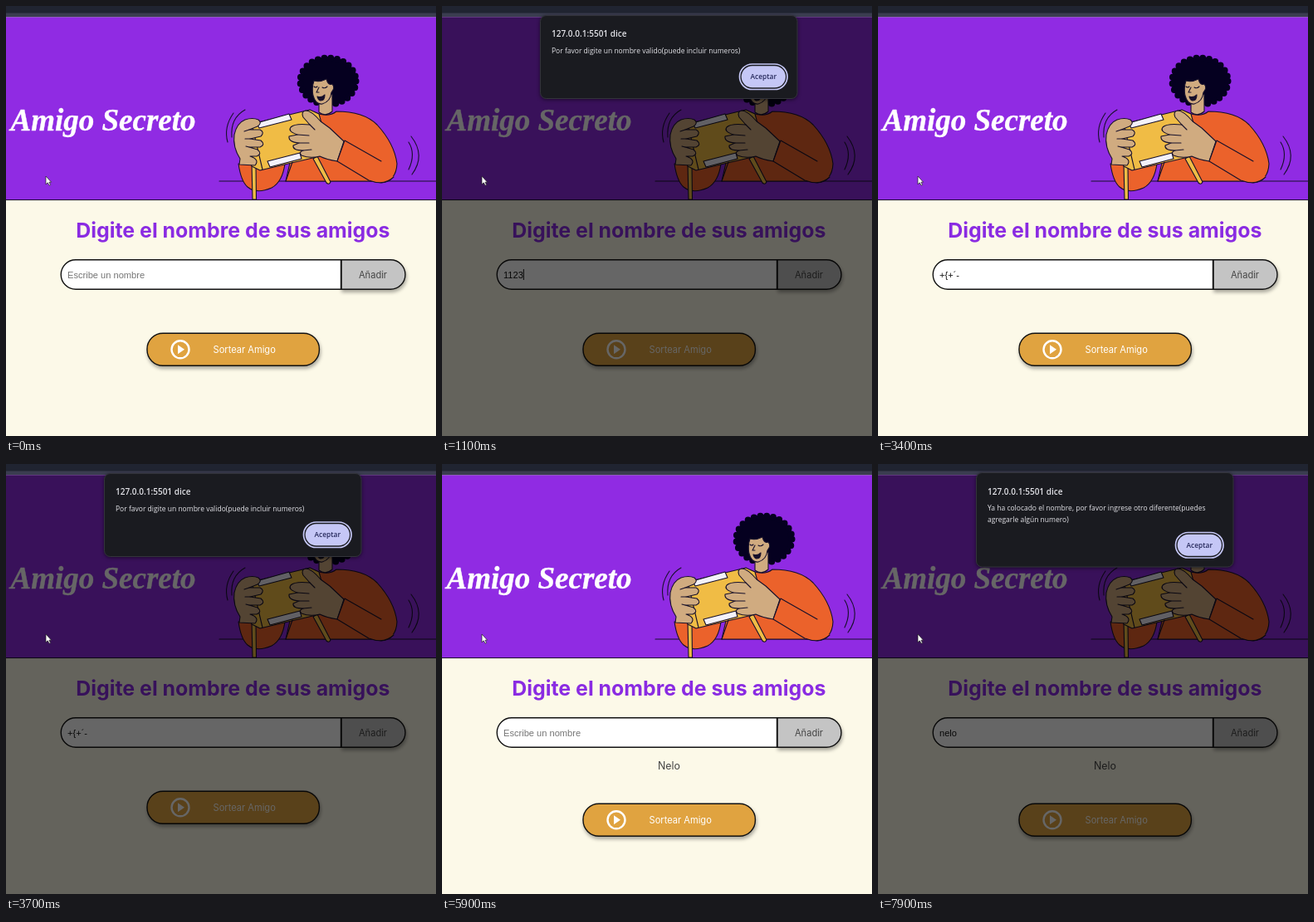
Animation of 518 by 518 pixels, one loop 8000 ms. Source, as an HTML page:

```html
<!DOCTYPE html>
<html lang="es">
<head>
<meta charset="utf-8">
<title>Amigo Secreto</title>
<style>
  html, body { margin: 0; width: 100%; height: 100%; overflow: hidden; background: #fcf9e8; }
  svg { display: block; width: 100vw; height: 100vh; }
  text { font-family: Inter, sans-serif; font-size: 11.1px; white-space: pre; }
  .mid { text-anchor: middle; }
  .title { font: italic 700 37px "Liberation Serif", serif; fill: #fff; stroke: #fff; stroke-width: .4; }
  .heading { font-size: 24.9px; font-weight: 700; fill: #8a2be2; }
  .field { font-family: "Liberation Sans", Arial, sans-serif; }
  .box { stroke: #111; stroke-width: 1.4; }
  .shadow { filter: drop-shadow(1px 3px 2px #0005); }
  .art { stroke: #17102b; stroke-width: 1.1; stroke-linejoin: round; stroke-linecap: round; }
  .orange { fill: #eb622b; }
  .yellow { fill: #f0bc45; }
  .skin { fill: #d0ab80; }
  .line { fill: none; }
  .dialog text { font-family: "Open Sans", sans-serif; font-size: 8.5px; fill: #e3e3e8; }
  .dialog .host { font-size: 10px; font-weight: 600; }
  .dialog .accept { font-size: 8.4px; font-weight: 600; fill: #26295c; }
</style>
</head>
<body>
<svg viewBox="0 0 518 518" preserveAspectRatio="none">
  <rect width="518" height="518" fill="#fcf9e8"/>
  <rect width="518" height="9" fill="#202431"/>
  <rect y="8.5" width="518" height="5" fill="#3b3d50"/>
  <rect y="13.4" width="518" height="220" fill="#902be3"/>
  <rect y="233" width="518" height="1.1" fill="#24103c"/>
  <text class="title mid" x="117" y="149.7">Amigo Secreto</text>

  <g class="art">
    <path class="line" d="M257 211H518"/>
    <path class="line" d="M274 129Q262 146 267 164M288 125Q270 135 272 158M485 164Q494 178 485 197M488 157Q506 180 489 203"/>
    <g fill="#050020" stroke="#050020">
      <ellipse cx="388" cy="90.5" rx="34" ry="28.5"/>
      <ellipse cx="388" cy="90.5" rx="33.5" ry="28" fill="none" stroke-width="8" stroke-dasharray="0 7.8"/>
    </g>
    <path class="orange" d="M337 211L344 180L372 128Q388 135 398 127Q431 127 447 143Q468 166 471 190Q470 211 452 213L440 211Z"/>
    <path class="skin" d="M377 110V128Q385 134 393 127V106Z"/>
    <path class="skin" d="M371 90Q368 99 370 108Q373 119 381 118Q391 115 392 104Q397 98 393 94Q388 96 386 88Q378 92 371 90Z"/>
    <path class="line" d="M371 97Q373 99 375 97M381 98Q384 100 387 97M377 98L374 104H377"/>
    <path d="M375 109Q380 111 384 107Q384 114 379 114Q376 113 375 109Z" fill="#17102b"/>
    <path class="orange" d="M280 190Q283 211 291 218Q302 227 320 219Q333 212 336 190Z"/>
    <path class="yellow" d="M296 190L297 233H301.5L301 190ZM370 184L386 213Q389 216 391 212L375 181Z"/>
    <path class="yellow" d="M279 146L366 125L377 130L389 174Q387 179 378 181L306 198L296 193Z"/>
    <path class="line" d="M296 142L309 197"/>
    <path d="M302 141L341 130L344 137L305 147ZM315 187L354 177L356 184L318 194Z" fill="#f4f2fa"/>
    <path class="skin" d="M281 191L282 184Q273 170 275 155Q278 141 288 137Q297 134 304 137Q309 141 303 145L293 149L306 149Q312 152 307 157L294 160L307 162Q313 167 306 170L293 170L303 173Q309 178 302 181L294 181Q306 185 300 192Z"/>
    <path class="line" d="M293 149L287 151M294 160L288 160M293 170L289 169"/>
    <path class="skin" d="M358 134Q355 127 361 126Q368 126 379 139L390 147L407 163L399 187Q386 185 378 181Q366 184 356 180Q352 176 358 174Q345 174 346 168L353 165Q340 164 341 157L351 155Q339 151 343 146Q348 141 366 143Z"/>
    <path class="line" d="M351 155L365 156M353 165L365 165M358 174L368 173M366 143L372 149"/>
    <path class="orange" d="M452 187L408 162L399 187L437 210Q456 217 467 206"/>
    <path class="line" d="M337 211L345 188"/>
  </g>

  <text class="heading mid" x="273.4" y="279">Digite el nombre de sus amigos</text>
  <path class="box shadow" fill="#c4c4c4" d="M404 305.7H463.2A17.8 17.8 0 0 1 463.2 341.3H404Z"/>
  <path class="box" fill="#fff" d="M403.5 305.7H84A17.8 17.8 0 0 0 84 341.3H403.5Z"/>
  <text class="mid" x="442" y="327.6" fill="#444">Añadir</text>
  <text class="field" id="entry" x="74" y="327.5"></text>
  <rect id="caret" y="317" width="1" height="13" fill="#111"/>
  <text class="mid" id="friend" x="273.4" y="368" fill="#444" style="font-size:12.4px">Nelo</text>

  <g id="draw">
    <rect class="box shadow" x="170" y="394.3" width="207.4" height="39" rx="19" fill="#e0a340"/>
    <circle cx="210" cy="413.8" r="10.5" fill="none" stroke="#fff" stroke-width="2.4"/>
    <path d="M207 408.3V419.3L215 413.8Z" fill="#fff"/>
    <text class="mid" x="287.2" y="417.9" fill="#fff">Sortear Amigo</text>
  </g>

  <rect id="scrim" y="13.4" width="518" height="505"/>

  <g class="dialog" id="dialog">
    <rect id="panel" x="118.5" width="309.5" rx="7" fill="#1a1b20" stroke="#33343b" style="filter:drop-shadow(0 1px 2px #0008)"/>
    <text class="host" x="132" y="37">127.0.0.1:5501 dice</text>
    <text id="line1" x="132"></text>
    <text id="line2" x="132" y="70"></text>
    <g id="accept">
      <rect id="ring" x="358.5" y="70" width="57.5" height="30.5" rx="15.2" fill="none" stroke="#c5c7f6" stroke-width="1.7"/>
      <rect x="360.7" y="72.2" width="53.2" height="26" rx="13" fill="#c5c7f6"/>
      <text class="accept mid" x="387.3" y="88.2">Aceptar</text>
    </g>
  </g>

  <path d="M48 205V214.8L50.3 212.8L52 216.2L53.6 215.4L52 212.2H54.6Z" fill="#fff" stroke="#222" stroke-width=".7"/>
</svg>
<script>
const LOOP = 8000, BLINK = 500, OPENING = 150, CLOSING = 250, ADDED = 5690;
const $ = id => document.getElementById(id);
const clamp = v => Math.max(0, Math.min(1, v));

const invalid = ['Por favor digite un nombre valido(puede incluir numeros)'];
const repeated = ['Ya ha colocado el nombre, por favor ingrese otro diferente(puedes',
                  'agregarle algún numero)'];
const alerts = [
  { open: 850, close: 1890, lines: invalid },
  { open: 3550, close: 4110, lines: invalid },
  { open: 7575, close: Infinity, lines: repeated },
];

// Each edit: time, field value, moment the caret blink restarts
const type = (word, times) => times.map((t, i) => [t, word.slice(0, i + 1), t]);
const edits = [
  [0, '', -910],
  ...type('1123', [290, 390, 490, 590]),
  [1890, '', 1890],
  ...type('+{+´-', [2390, 2490, 2690, 2790, 2890]),
  [4110, '', 4110],
  ...type('Nelo', [4790, 4990, 5190, 5390]),
  [ADDED, '', 5390],
  ...type('nelo', [6590, 6790, 6990, 7070]),
];

function renderField(t, alert) {
  const [, value, blinkStart] = edits.findLast(e => e[0] <= t);
  const entry = $('entry');
  entry.textContent = value;
  const caretX = 74 + (value ? entry.getComputedTextLength() : 0);
  entry.textContent = value || 'Escribe un nombre';
  entry.setAttribute('fill', value ? '#111' : '#757575');
  const caretTime = alert && t < alert.close ? alert.open : t;
  const visible = Math.floor((caretTime - blinkStart) / BLINK) % 2 === 0;
  $('caret').setAttribute('x', caretX);
  $('caret').setAttribute('opacity', visible ? 1 : 0);
}

function renderDialog(t, alert) {
  const active = alert && t < alert.close;
  const shown = alert ? clamp((t - alert.open) / OPENING) : 0;
  const opacity = active ? shown : alert ? 1 - (t - alert.close) / CLOSING : 0;
  $('scrim').setAttribute('opacity', active ? 0.6 * shown : 0);
  $('dialog').setAttribute('opacity', opacity);
  if (!alert) return;
  const extra = alert.lines.length > 1 ? 12.5 : 0;
  const lift = (1 - opacity) * 16;
  $('dialog').setAttribute('transform', `translate(0 ${-lift})`);
  $('panel').setAttribute('y', extra ? 10.5 : 11.5);
  $('panel').setAttribute('height', extra ? 113.5 : 100);
  $('line1').setAttribute('y', extra ? 56 : 57.3);
  $('line1').textContent = alert.lines[0];
  $('line2').textContent = alert.lines[1] || '';
  $('accept').setAttribute('transform', `translate(0 ${extra})`);
  $('ring').setAttribute('opacity', active ? 1 : 0);
}

function render(t) {
  const alert = alerts.find(a => t >= a.open && t < a.close + CLOSING);
  const added = t >= ADDED;
  renderField(t, alert);
  renderDialog(t, alert);
  $('friend').setAttribute('opacity', added ? 1 : 0);
  $('draw').setAttribute('transform', `translate(0 ${added ? 15 : 0})`);
}

const start = performance.now();
(function frame() {
  render((performance.now() - start) % LOOP);
  requestAnimationFrame(frame);
})();
</script>
</body>
</html>
```
